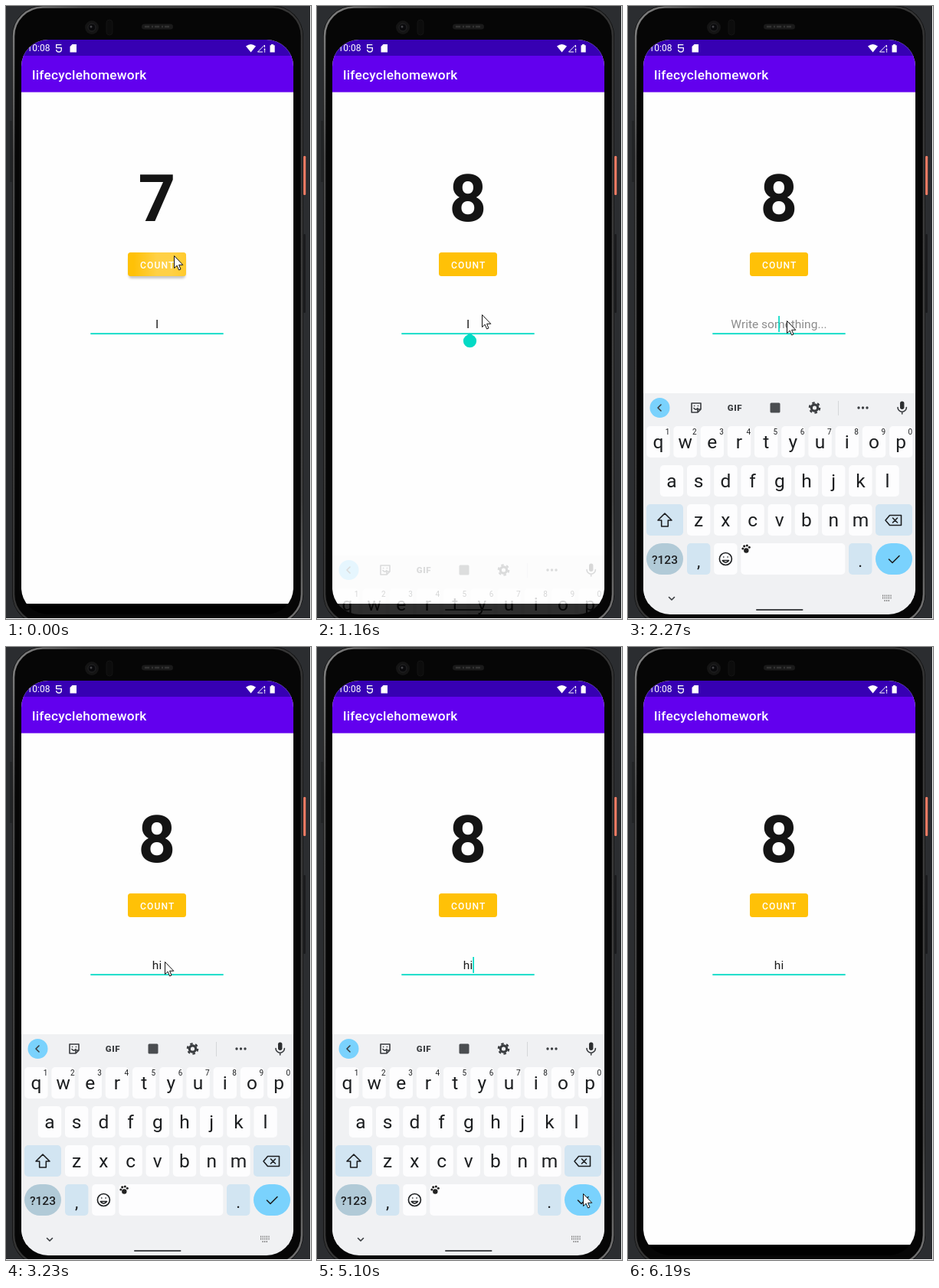
Animation, 398 px wide and 801 px high, one loop 6310 ms. Source, as an HTML page:

```html
<!DOCTYPE html>
<html lang="en">
<head>
<meta charset="utf-8">
<title>Counter app</title>
<style>
  html, body { margin: 0; width: 100%; height: 100%; overflow: hidden; background: #2b2d30; }
  svg { display: block; width: 398px; height: 801px; }
  text { font-family: Roboto, sans-serif; }
  .mid { text-anchor: middle; }
  .ico { fill: none; stroke: #3a3d40; stroke-width: 1.6; stroke-linejoin: round; stroke-linecap: round; }
</style>
</head>
<body>
<svg viewBox="0 0 398 801">
  <defs>
    <clipPath id="screen"><rect x="20" y="44" width="355" height="751" rx="35"/></clipPath>
    <linearGradient id="metal" x1="0" y1="0" x2="1" y2="1">
      <stop offset="0" stop-color="#858585"/><stop offset=".12" stop-color="#4a4a4a"/>
      <stop offset=".5" stop-color="#333"/><stop offset=".9" stop-color="#454545"/>
      <stop offset="1" stop-color="#777"/>
    </linearGradient>
    <linearGradient id="ripple">
      <stop offset=".1" stop-color="#fff" stop-opacity="0"/><stop offset=".5" stop-color="#fff"/>
      <stop offset=".75" stop-color="#fff"/><stop offset="1" stop-color="#fff" stop-opacity=".6"/>
    </linearGradient>
    <filter id="soft" x="-20%" y="-30%" width="140%" height="180%"><feGaussianBlur stdDeviation="1.6"/></filter>
  </defs>

  <!-- device -->
  <rect width="398" height="801" fill="#2b2d30"/>
  <rect x="5" y="150" width="3" height="80" fill="#222426"/>
  <rect x="388" y="196" width="3.2" height="51" rx="1.2" fill="#ee7a63"/>
  <rect x="388.5" y="298" width="2.2" height="103" rx="1" fill="#17181a"/>
  <rect x="8" y="-.5" width="380" height="809" rx="40" fill="#0a0a0a"/>
  <rect x="10" y="1.5" width="376" height="805" rx="38" fill="#060606" stroke="url(#metal)" stroke-width="2.6"/>
  <circle cx="112" cy="28" r="9" fill="#141414"/>
  <circle cx="112" cy="28" r="5" fill="#0a0a0c" stroke="#242426"/>
  <circle cx="111" cy="27" r="1.5" fill="#444448"/>
  <rect x="131" y="18" width="8" height="20" rx="4" fill="#0c0c0c" stroke="#131313"/>
  <rect x="177" y="23.5" width="41" height="7" rx="3.5" fill="#1a1a1a"/>
  <path d="M181 27H214" stroke="#333" stroke-width="2.5" stroke-dasharray="6 3 2 2"/>

  <g clip-path="url(#screen)">
    <rect x="20" y="44" width="355" height="751"/>
    <rect x="20" y="44" width="355" height="737" fill="#fefefe"/>
    <rect x="20" y="44" width="355" height="22" fill="#3700b3"/>
    <rect x="20" y="65" width="355" height="47.6" fill="#6200ee"/>

    <g fill="#fff">
      <text x="57.5" y="59.3" font-size="12" text-anchor="end">10:08</text>
      <path d="M72.3 50.6H65.7V54.6H72.3V57Q72.3 60 69 60T65.7 57" fill="none" stroke="#fff" stroke-width="1.3"/>
      <path d="M83.5 53L86.5 50H92V60.5H83.5Z"/>
      <path d="M313 52.5Q319.5 47.5 326 52.5L319.5 60.5Z"/>
      <path d="M328.5 60L337.5 51V54M328.5 60H335" fill="none" stroke="#fff" stroke-width="1"/>
      <path d="M336.8 55.5h1.4v3h-1.4zM336.8 59.3h1.4v1.3h-1.4z"/>
      <path d="M344.5 51.3H346V50H349V51.3H350.7V60.5H344.5Z"/>
    </g>
    <text x="34" y="96" font-size="17.3" font-weight="500" letter-spacing=".22" fill="#fff">lifecyclehomework</text>

    <text id="count" class="mid" x="197" y="281" font-size="85" font-weight="700" fill="#141414">7</text>

    <rect id="shadow" x="160" y="327" width="74" height="29" rx="4" opacity=".22" filter="url(#soft)"/>
    <rect x="159" y="322" width="76" height="31" rx="3.5" fill="#ffc107"/>
    <rect id="glow" x="159" y="322" width="76" height="31" rx="3.5" fill="url(#ripple)"/>
    <text class="mid" x="197.7" y="342.6" font-size="12.1" font-weight="500" letter-spacing="1.08" fill="#fff">COUNT</text>

    <text id="field" class="mid" x="197" y="421" font-size="15.5"></text>
    <rect x="110.3" y="427.3" width="173.4" height="1.8" fill="#03dac5"/>
    <path id="handle" d="M199.5 427.5L205.6 431.7A8.6 8.6 0 1 1 193.4 431.7Z" fill="#03dac5"/>
    <rect id="caret" y="405" width="1.7" height="21" fill="#03dac5"/>

    <g id="board">
      <rect id="back" x="20" y="506" width="355" height="290" fill="#f0f1f3"/>
      <g id="nav" class="ico" stroke-width="1.3">
        <path d="M53.5 772.5L57 776L60.5 772.5"/>
        <path d="M332 770.5H345M332 773.5H345M334.5 777H342" stroke="#777" stroke-width="2" stroke-dasharray="1.2 1.4" stroke-linecap="butt"/>
      </g>
      <g id="keys">
        <circle cx="41.5" cy="525" r="13" fill="#7ad2fd"/>
        <path id="arrow" class="ico"/>
        <g id="tools">
          <path class="ico" d="M83 519H95V527L91 531H83ZM95 527H91V531M86 525.5Q88.5 529 91 525.5M86.5 522.5h.2M91.3 522.5h.2"/>
          <text class="mid" x="139.5" y="529" font-size="11.5" font-weight="900" letter-spacing=".6" fill="#3a3d40">GIF</text>
          <rect x="185.5" y="518.5" width="13" height="13" rx="1.5" fill="#4a4d50"/>
          <circle cx="243.5" cy="525" r="4.2" fill="none" stroke="#3a3d40" stroke-width="3.2"/>
          <circle cx="243.5" cy="525" r="6.7" fill="none" stroke="#3a3d40" stroke-width="2.2" stroke-dasharray="3.5 3.516"/>
          <path d="M274.5 516V535" stroke="#d5d7da"/>
          <path d="M301 525h.01M306.5 525h.01M312 525h.01" stroke="#3a3d40" stroke-width="3.4" stroke-linecap="round"/>
        </g>
        <rect x="355" y="516.5" width="5.4" height="10.5" rx="2.7" fill="#2d2f31"/>
        <path class="ico" d="M352 524.5A5.7 5.7 0 0 0 363.4 524.5M357.7 530.5V533"/>
      </g>
      <rect x="167" y="788" width="61.5" height="2" rx="1" fill="#45474a"/>
    </g>
  </g>
  <path d="M397.5 0V800.5H0" fill="none" stroke="#fff"/>
  <path id="mouse" d="M.5 .5V16.6L4.2 13.2L6.6 19L9 18L6.6 12.3H11.8Z" fill="#fff" stroke="#111" stroke-width="1" stroke-linejoin="round"/>
</svg>
<script>
const LOOP = 6310;
const $ = id => document.getElementById(id);
const keys = $('keys');

function add(tag, attrs, text) {
  const el = document.createElementNS('http://www.w3.org/2000/svg', tag);
  for (const k in attrs) el.setAttribute(k, attrs[k]);
  if (text) el.textContent = text;
  keys.append(el);
}
function key(x, y, w, fill = '#fdfdfe', r = 5) {
  add('rect', { x, y, width: w, height: 41, rx: r, fill });
}
function label(x, y, size, text, weight = 400) {
  add('text', { x, y, 'font-size': size, 'font-weight': weight, class: 'mid', fill: '#1c1e20' }, text);
}
function icon(d) { add('path', { d, class: 'ico', style: 'stroke:#1c1e20' }); }

function buildKeys() {
  const pitch = 35.2, blue = '#d2e5f2';
  [['qwertyuiop', 39.4, 549], ['asdfghjkl', 57, 600], ['zxcvbnm', 92.2, 651]].forEach(([row, x0, y], r) => {
    [...row].forEach((c, i) => {
      const x = x0 + i * pitch;
      key(x - 15.2, y, 30.4);
      label(x, y + 29, 24.5, c);
      if (!r) label(x + 12.2, y + 11.2, 10, String((i + 1) % 10));
    });
  });
  key(24, 651, 48, blue);
  key(323, 651, 48, blue);
  icon('M48 663L57 672H52.3V680H43.7V672H39Z');
  icon('M341.5 665.5H356.5V678.5H341.5L336 672ZM345.5 669L351.5 675M351.5 669L345.5 675');
  key(24, 702, 48, '#b1cad7', 20.5);
  label(48, 728.5, 15.5, '?123', 500);
  key(77, 702, 30.4, blue);
  label(92.2, 733, 22, ',');
  key(112.2, 702, 30.4);
  icon('M119.4 722.5a8 8 0 1 0 16 0a8 8 0 1 0 -16 0M123.3 724.5Q127.4 730 131.5 724.5ZM124.7 720h.2M130 720h.2');
  key(147.3, 702, 136);
  [[154.3, 711.5, 3.2], [149.8, 709, 1.5], [151.7, 705.8, 1.6], [155.3, 705, 1.6], [158.3, 707.3, 1.5]]
    .forEach(([cx, cy, r]) => add('circle', { cx, cy, r, fill: '#222' }));
  key(288, 702, 30.4, blue);
  label(303.2, 733, 22, '.');
  key(323, 702, 48, '#7ad2fd', 20.5);
  icon('M340.5 723L345 727.5L354 718.5');
}
buildKeys();

// Each track lists [start time, ...values]; values hold until the next entry.
const mouse = [
  [0, 219, 326], [400, 218, 406], [550, 217, 405.5], [670, 216, 404], [790, 215, 403],
  [1450, 212, 407], [1600, 207, 411],
  [4190, 222, 432], [4310, 268, 522], [4430, 318, 632], [4560, 340, 689],
  [4710, 342, 703], [4860, 345, 711], [4980, 347, 714], [5770, 346, 756], [5890, -99, 0]
];
const board = [ // opacity, key offset
  [0, 0, 0], [1160, .18, 212], [1300, .9, 11], [1450, 1, 0],
  [5250, .6, 60], [5370, .09, 182], [5490, 0, 0]
];
const glow = [[0, .25], [130, .3], [400, .2], [550, .12], [670, .06], [790, 0]];
const hint = 'Write something...';
const field = [[0, 'I', 199.3], [2150, hint, 196.2], [2580, 'h', 200.6], [2830, 'hi', 203.3]];
const caret = [
  [0, 0], [1300, 1], [1750, 0], [2150, 1], [3230, 0], [3800, 1],
  [4310, 0], [4710, 1], [5250, 0], [5770, 1], [6190, 0]
];

function at(track, t) {
  let hit = track[0];
  for (const step of track) if (step[0] <= t) hit = step;
  return hit.slice(1);
}
const show = (id, on) => $(id).setAttribute('visibility', on ? 'visible' : 'hidden');
const move = (id, x, y) => $(id).setAttribute('transform', `translate(${x} ${y})`);

function draw(t) {
  $('count').textContent = t < 130 ? 7 : 8;
  show('shadow', t < 130);
  $('glow').setAttribute('opacity', at(glow, t)[0]);

  const [text, x] = at(field, t);
  $('field').textContent = text;
  $('field').setAttribute('fill', text === hint ? '#8c8c8c' : '#1c1c1c');
  $('caret').setAttribute('x', x);
  show('caret', at(caret, t)[0]);
  show('handle', t >= 1160 && t < 2150);

  const [alpha, shift] = at(board, t);
  const closing = t >= 5370;
  $('board').setAttribute('opacity', alpha);
  move('keys', 0, shift);
  move('back', 0, shift);
  show('tools', !closing);
  show('nav', alpha > .2);
  $('arrow').setAttribute('d', closing ? 'M40 521L44 525L40 529' : 'M43 521L39 525L43 529');

  move('mouse', ...at(mouse, t));
}

const start = performance.now();
function tick() {
  draw((performance.now() - start) % LOOP);
  requestAnimationFrame(tick);
}
draw(0);
requestAnimationFrame(tick);
</script>
</body>
</html>
```
